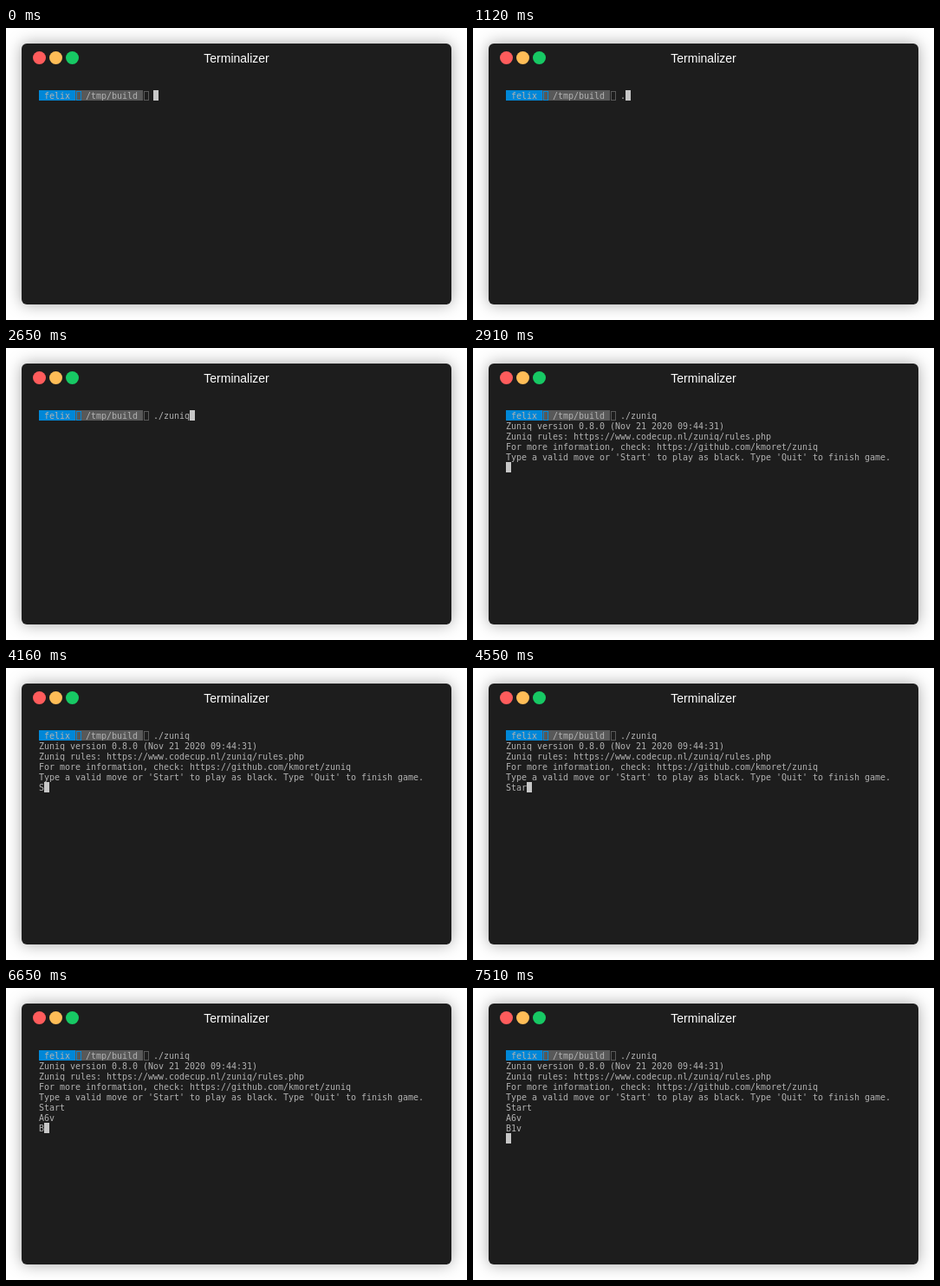
These frames come from a looping animation (532 by 338 pixels, 8000 ms). An HTML page:

```html
<!DOCTYPE html>
<html lang="en">
<head>
<meta charset="utf-8">
<title>Terminal session</title>
<style>
  html, body { margin: 0; width: 100%; height: 100%; overflow: hidden; background: #fff; }
  #win {
    position: absolute; left: 18px; top: 18px; width: 496px; height: 302px;
    border-radius: 6px; background: #1d1d1d; box-shadow: 0 0 18px rgba(0, 0, 0, .35);
  }
  svg { position: absolute; left: 0; top: 0; display: block; }
  .title { font: 14px "Liberation Sans", Arial, sans-serif; fill: #fff; text-anchor: middle; }
  .mono { font: 10px "DejaVu Sans Mono", monospace; fill: #b2b2b2; white-space: pre; }
  .box { fill: none; stroke-width: 1; }
</style>
</head>
<body>
<div id="win"></div>
<svg width="532" height="338" viewBox="0 0 532 338">
  <circle cx="38.5" cy="34.5" r="7.5" fill="#ff5c5c"/>
  <circle cx="57.5" cy="34.5" r="7.5" fill="#ffbd57"/>
  <circle cx="76.5" cy="34.5" r="7.5" fill="#17c964"/>
  <text class="title" x="266" y="40">Terminalizer</text>
  <rect x="38" y="72" width="42" height="12" fill="#0087d7"/>
  <rect x="80" y="72" width="78" height="12" fill="#585858"/>
  <rect class="box" x="81.5" y="73.5" width="5" height="10" stroke="#0087d7"/>
  <rect class="box" x="159.5" y="73.5" width="5" height="10" stroke="#585858"/>
  <g id="prompt" class="mono"></g>
  <g id="screen" class="mono"></g>
  <rect id="cursor" width="6" height="12" fill="#c7c7c7"/>
</svg>
<script>
const LOOP = 8000, LEFT = 38, TOP = 72, CELL_W = 6, CELL_H = 12, PROMPT_COLS = 22;

const banner = [
  "",
  "Zuniq version 0.8.0 (Nov 21 2020 09:44:31)",
  "Zuniq rules: https://www.codecup.nl/zuniq/rules.php",
  "For more information, check: https://github.com/kmoret/zuniq",
  "Type a valid move or 'Start' to play as black. Type 'Quit' to finish game.",
  ""
].join("\n");

// [time in ms, text added to the terminal]
const steps = [
  [1120, "."], [1530, "/"], [1820, "z"], [2020, "u"], [2260, "n"], [2380, "i"], [2650, "q"],
  [2910, banner],
  [4160, "S"], [4340, "t"], [4410, "a"], [4550, "r"], [4720, "t"],
  [4880, "\nA6v\n"],
  [6650, "B"], [6980, "1"], [7300, "v"],
  [7510, "\n"]
];

const byId = id => document.getElementById(id);
const screenEl = byId("screen"), cursor = byId("cursor");
const colX = col => LEFT + col * CELL_W;
const rowY = row => TOP + row * CELL_H;

// One text element per line, each character on its grid cell
function addLine(parent, text, row, col) {
  if (!text) return;
  const el = document.createElementNS("http://www.w3.org/2000/svg", "text");
  el.setAttribute("x", Array.from(text, (_, i) => colX(col + i)).join(" "));
  el.setAttribute("y", rowY(row) + 10);
  el.textContent = text;
  parent.append(el);
}

function draw(count) {
  const lines = steps.slice(0, count).map(step => step[1]).join("").split("\n");
  const startCol = row => row === 0 ? PROMPT_COLS : 0;
  screenEl.replaceChildren();
  lines.forEach((line, row) => addLine(screenEl, line, row, startCol(row)));
  const last = lines.length - 1;
  cursor.setAttribute("x", colX(startCol(last) + lines[last].length));
  cursor.setAttribute("y", rowY(last));
}

addLine(byId("prompt"), "felix", 0, 1);
addLine(byId("prompt"), "/tmp/build", 0, 9);

const start = performance.now();
let shown = -1;
function tick() {
  const t = (performance.now() - start) % LOOP;
  const count = steps.filter(step => step[0] <= t).length;
  if (count !== shown) draw(shown = count);
  requestAnimationFrame(tick);
}
tick();
</script>
</body>
</html>
```
